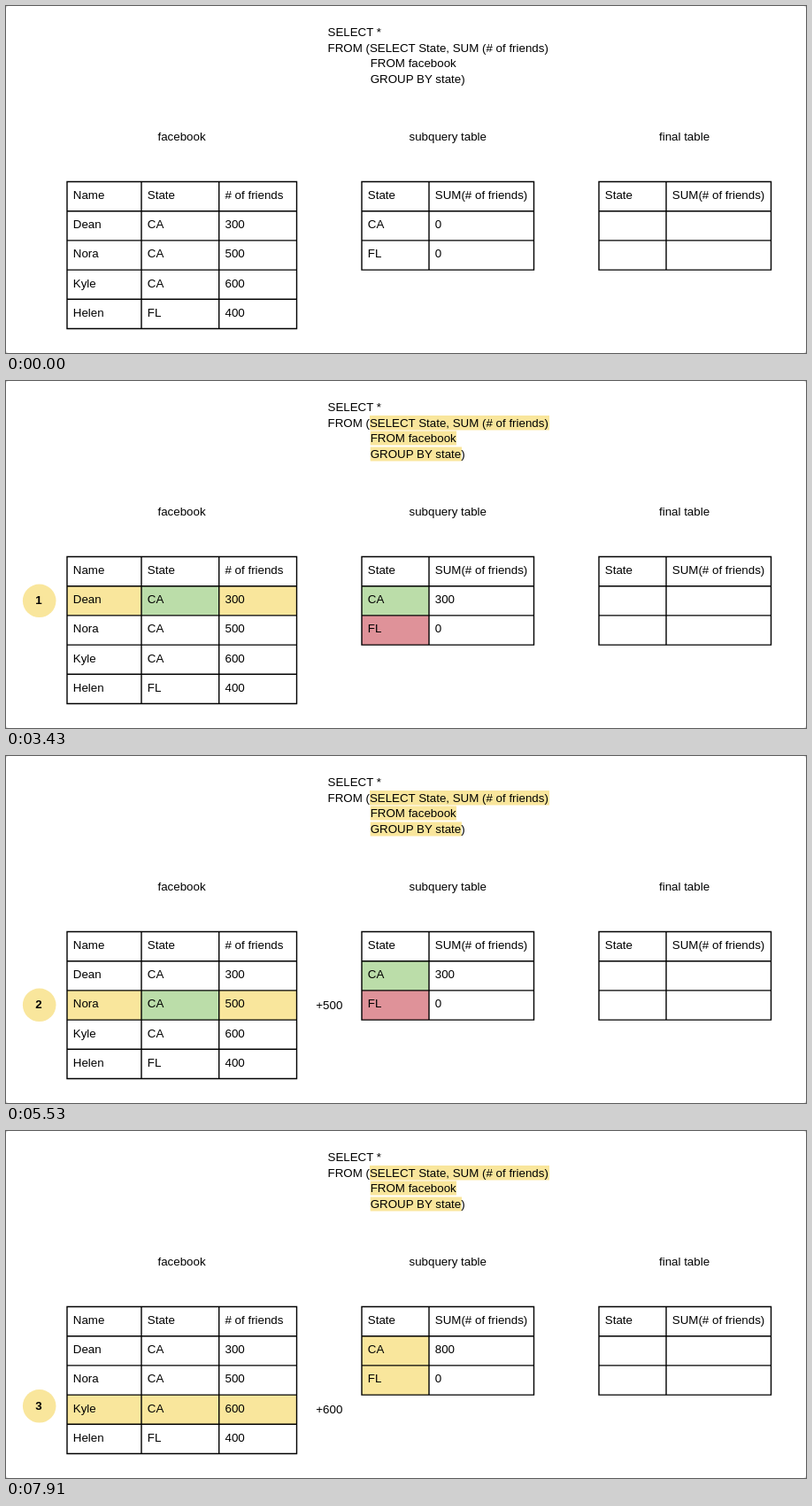
These frames come from a looping animation (904x392 px, 8000 ms). An HTML page:

```html
<!DOCTYPE html>
<html lang="en">
<head>
<meta charset="utf-8">
<title>Subquery walkthrough</title>
<style>
  html, body { margin: 0; width: 100%; height: 100%; overflow: hidden; background: #ccc; }
  svg { display: block; width: 904px; height: 392px; }
  text { font: 13.333px "Liberation Sans", Arial, sans-serif; white-space: pre; }
  .step { font-weight: bold; text-anchor: middle; }
</style>
</head>
<body>
<svg id="stage" viewBox="0 0 904 392"></svg>
<script>
const LOOP = 8000;
const YELLOW = '#f9e69c', GREEN = '#bbdda9', RED = '#df9299';
const stage = document.getElementById('stage');

function add(tag, attrs, content) {
  const el = document.createElementNS('http://www.w3.org/2000/svg', tag);
  for (const key in attrs) el.setAttribute(key, attrs[key]);
  if (content !== undefined) el.textContent = content;
  return stage.appendChild(el);
}
const label = (x, y, content) => add('text', { x, y }, content);
const box = (x, y, right, bottom) =>
  add('rect', { x, y, width: right - x, height: bottom - y, fill: 'none' });

// Row edges and text baselines shared by all tables
const edgeY = row => 198.5 + row * 33.2;
const baseY = row => Math.round(218 + row * 33.2);

function table(xs, rows) {
  const fills = rows.map((_, r) =>
    xs.slice(1).map((right, c) => box(xs[c], edgeY(r), right, edgeY(r + 1))));
  const bottom = edgeY(rows.length);
  let d = xs.map(x => `M${x} ${edgeY(0)}V${bottom}`).join('');
  for (let r = 0; r <= rows.length; r++) d += `M${xs[0]} ${edgeY(r)}H${xs[xs.length - 1]}`;
  add('path', { d, stroke: '#000', 'stroke-width': 1.4, 'stroke-linecap': 'square', fill: 'none' });
  const texts = rows.map((row, r) => row.map((cell, c) => label(xs[c] + 6.8, baseY(r), cell)));
  return { fills, texts };
}

add('rect', { width: 904, height: 392, rx: 3, fill: '#fff' });

const codeMarks = [
  box(411, 39, 614, 55.5),
  box(411.7, 56.5, 509, 72.5),
  box(411.7, 74.5, 515, 90.5)
];
label(363.5, 34, 'SELECT *');
label(363.5, 52, 'FROM (SELECT State, SUM (# of friends)');
label(411.7, 69, 'FROM facebook');
label(411.7, 87, 'GROUP BY state)');
label(171.5, 152, 'facebook');
label(455.5, 152, 'subquery table');
label(738, 152, 'final table');

const people = table([69, 153, 240.7, 328.5], [
  ['Name', 'State', '# of friends'],
  ['Dean', 'CA', '300'],
  ['Nora', 'CA', '500'],
  ['Kyle', 'CA', '600'],
  ['Helen', 'FL', '400']
]);
const groups = table([402, 478, 596.5], [
  ['State', 'SUM(# of friends)'], ['CA', '0'], ['FL', '0']
]);
table([670, 746, 864.5], [['State', 'SUM(# of friends)'], ['', ''], ['', '']]);

const badge = add('circle', { cx: 37.7, r: 18.8 });
const badgeText = add('text', { x: 37, class: 'step' }, '');
const plus = label(350.3, 0, '');

const CODE_AT = 420;
const steps = [
  { circle: 630, row: 980, plus: 1610, compare: 2100, match: 2380, sum: 2870, cy: 248.3, add: 300 },
  { circle: 3570, row: 3920, plus: 4480, compare: 4970, match: 5250, sum: 5740, cy: 281.3, add: 500 },
  { circle: 6510, row: 6860, plus: 7420, compare: 7910, match: LOOP, sum: LOOP, cy: 310.8, add: 600 }
];

const paint = (el, color) => el.setAttribute('fill', color || 'none');

function render(t) {
  codeMarks.forEach(mark => paint(mark, t >= CODE_AT && YELLOW));

  const current = steps.filter(s => t >= s.circle).length - 1;
  const step = steps[current];
  const past = key => !!step && t >= step[key];

  paint(badge, step && YELLOW);
  badgeText.textContent = step ? current + 1 : '';
  if (step) {
    badge.setAttribute('cy', step.cy);
    badgeText.setAttribute('y', Math.round(step.cy + 4));
    plus.setAttribute('y', Math.round(253 + current * 33));
  }

  steps.forEach((_, i) => people.fills[i + 1].forEach((cell, c) => {
    const active = i === current && past('row');
    paint(cell, active && (c === 1 && past('match') ? GREEN : YELLOW));
  }));

  [GREEN, RED].forEach((color, i) =>
    paint(groups.fills[i + 1][0], past('match') ? color : past('compare') && YELLOW));

  plus.textContent = past('plus') && !past('sum') ? '+' + step.add : '';
  groups.texts[1][1].textContent =
    steps.reduce((total, s) => total + (t >= s.sum ? s.add : 0), 0);
}

const start = performance.now();
function tick() {
  render((performance.now() - start) % LOOP);
  requestAnimationFrame(tick);
}
tick();
</script>
</body>
</html>
```
